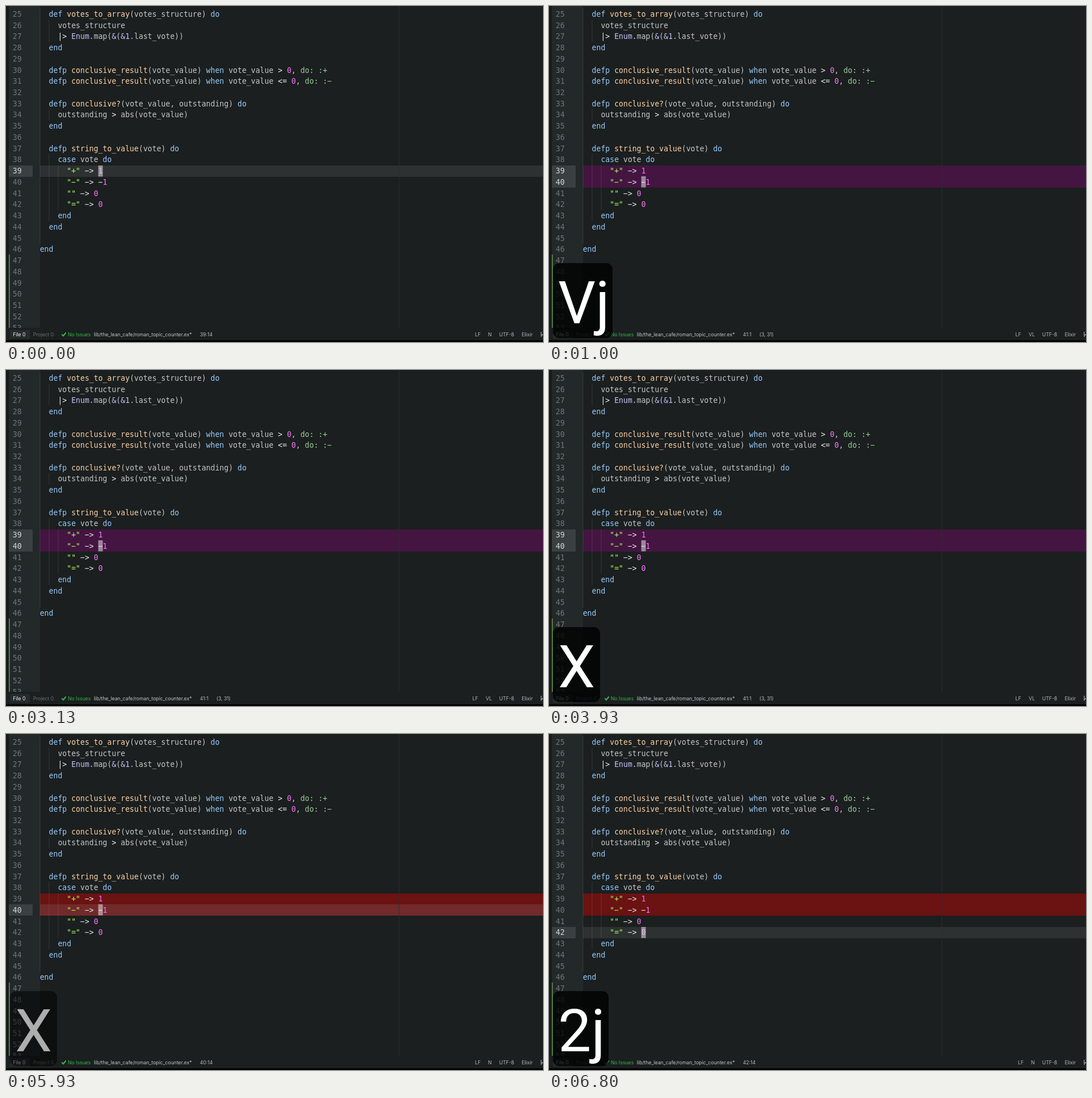
Animation, 947 px wide and 592 px high, one loop 8000 ms. Source, as an HTML page with a canvas:

```html
<!DOCTYPE html>
<html lang="en">
<head>
<meta charset="utf-8">
<title>Editor</title>
<style>
html, body { margin: 0; width: 100%; height: 100%; overflow: hidden; background: #000; }
canvas { display: block; }
</style>
</head>
<body>
<canvas id="stage" width="947" height="592"></canvas>
<script>
const ctx = document.getElementById("stage").getContext("2d");
const FIRST = 25, TOP = 4.2, PITCH = 19.74, LEFT = 59.7, CHAR = 7.922;
const MONO = '13.16px "DejaVu Sans Mono", monospace';
const UI = "8.65px Inter, sans-serif";
const KEYS = "104px Roboto, sans-serif";

const code = `  def votes_to_array(votes_structure) do
    votes_structure
    |> Enum.map(&(&1.last_vote))
  end

  defp conclusive_result(vote_value) when vote_value > 0, do: :+
  defp conclusive_result(vote_value) when vote_value <= 0, do: :-

  defp conclusive?(vote_value, outstanding) do
    outstanding > abs(vote_value)
  end

  defp string_to_value(vote) do
    case vote do
      "+" -> 1
      "-" -> -1
      "" -> 0
      "=" -> 0
    end
  end

end`.split("\n");

const rules = [
  [/"[^"]*"/, "#a8ff60"],
  [/do:|:[+-]/, "#99cc99"],
  [/(?<=defp? )[\w?]+/, "#ffd2a7"],
  [/\b(?:defp?|do|end|case|when)\b/, "#96cbfe"],
  [/Enum|&\d?/, "#c6c5fe"],
  [/\b\d+/, "#ff73fd"],
  [/[|<>=-]+/, "#ededed"],
  [/\w+|[^\s\w]/, "#c5c8c6"]
];
const lexer = new RegExp(rules.map(r => `(${r[0].source})`).join("|"), "g");
const tokens = code.flatMap((line, row) => [...line.matchAll(lexer)].map(m => ({
  text: m[0].replace(/-/g, "\u2212"),
  x: LEFT + m.index * CHAR,
  row: FIRST + row,
  color: rules[m.slice(1).findIndex(g => g !== undefined)][1]
})));

// [column x, first row, last row]
const guides = [[60, 25, 45], [76, 26, 27], [76, 34, 34], [76, 38, 43], [92, 39, 42]];

const GREY = "#2d3131", PURPLE = "#441541", RED = "#6b1212", RED_LIT = "#722a2b";
const editorStates = [
  { at: 0, cursor: 39, active: [39], rows: { 39: GREY }, pos: "39:14" },
  { at: 730, cursor: 39, active: [39], rows: { 39: PURPLE }, pos: "40:1", sel: "(2, 15)" },
  { at: 930, cursor: 40, active: [39, 40], rows: { 39: PURPLE, 40: PURPLE }, pos: "41:1", sel: "(3, 31)" },
  { at: 4000, cursor: 40, active: [40], rows: { 39: RED, 40: RED_LIT }, pos: "40:14" },
  { at: 6800, cursor: 42, active: [42], rows: { 39: RED, 40: RED, 42: GREY }, pos: "42:14" }
];
const keyStates = [
  { at: 0 },
  { at: 730, keys: "V", right: 90 },
  { at: 1000, keys: "Vj", right: 112 },
  { at: 2930, keys: "Vj", right: 112, fade: [.86, .58, .29, 0] },
  { at: 3930, keys: "X", right: 90 },
  { at: 5930, keys: "X", right: 90, fade: [.66, .4, .15, 0] },
  { at: 6670, keys: "2", right: 82 },
  { at: 6735, keys: "2j", right: 105 }
];

const stateAt = (states, t) => states.filter(s => s.at <= t).pop();
const rowTop = row => TOP + (row - FIRST) * PITCH;

function rect(color, x, y, w, h) {
  ctx.fillStyle = color;
  ctx.fillRect(x, y, w, h);
}

function text(font, color, str, x, y) {
  ctx.font = font;
  ctx.fillStyle = color;
  ctx.fillText(str, x, y);
}

function stroke(color, width, path) {
  ctx.strokeStyle = color;
  ctx.lineWidth = width;
  ctx.stroke(new Path2D(path));
}

function drawEditor({ cursor, active, rows }) {
  rect("#1b1f1f", 0, 0, 947, 592);
  rect("#171b1b", 0, 0, 5, 567);
  rect("#232829", 5, 0, 55, 567);
  for (const row of active) rect("#3a3f41", 5, Math.round(rowTop(row)), 42, 20);
  for (const row in rows) rect(rows[row], 60, Math.round(rowTop(row)), 887, 20);
  rect("#2a2f30", 692.5, 0, 1, 567);
  for (const [x, from, to] of guides)
    rect("rgba(150,160,160,.2)", x - .5, rowTop(from), 1, (to - from + 1) * PITCH);
  rect("#6a9a48", 5, 438, 1.5, 129);
  for (let row = FIRST; row <= 53; row++)
    text(MONO, active.includes(row) ? "#d5d8d8" : "#70767a", row, 11.8, rowTop(row) + 14.6);
  for (const { text: str, x, row, color } of tokens) text(MONO, color, str, x, rowTop(row) + 14.6);
  rect("rgba(225,220,225,.57)", LEFT + 13 * CHAR, Math.round(rowTop(cursor)), 8, 19.5);
}

function drawStatus({ pos, sel }) {
  const label = (str, x, color = "#b6babb") => text(UI, color, str, x, 581.7);
  rect("#1b1f20", 0, 567, 947, 22);
  rect("#000", 0, 589, 947, 3);
  rect("#262b2c", 7, 571, 35, 15);
  label("File 0", 12.3, "#f0f2f2");
  label("Project 0", 47.7, "#6b7072");
  stroke("#32b84a", 2, "M98.3 578.5 L101 581.2 L105.7 575.5");
  label("No Issues", 109, "#32b84a");
  label("lib/the_lean_cafe/roman_topic_counter.ex*", 155, "#c2c6c7");
  label(pos, 342);
  if (sel) label(sel, 371);
  label("LF", sel ? 822.5 : 827);
  label(sel ? "VL" : "N", sel ? 846 : 850);
  label("UTF-8", 869.8);
  label("Elixir", 909.5);
  stroke("#b6babb", 1.1, "M943.8 574 V583 M943.8 580 Q947 580 948 577");
}

function drawKeys({ at, keys, right, fade }, t) {
  if (!keys) return;
  ctx.globalAlpha = fade ? fade[Math.min(3, Math.floor((t - at) / 66.6))] : 1;
  ctx.fillStyle = "rgba(0,0,0,.8)";
  ctx.beginPath();
  ctx.roundRect(7, 453, right - 7, 132, 11);
  ctx.fill();
  text(KEYS, "#fff", keys, 16, 559);
  ctx.globalAlpha = 1;
}

const start = performance.now();
function frame() {
  const t = (performance.now() - start) % 8000;
  const editor = stateAt(editorStates, t);
  drawEditor(editor);
  drawStatus(editor);
  drawKeys(stateAt(keyStates, t), t);
  requestAnimationFrame(frame);
}
frame();
</script>
</body>
</html>
```
